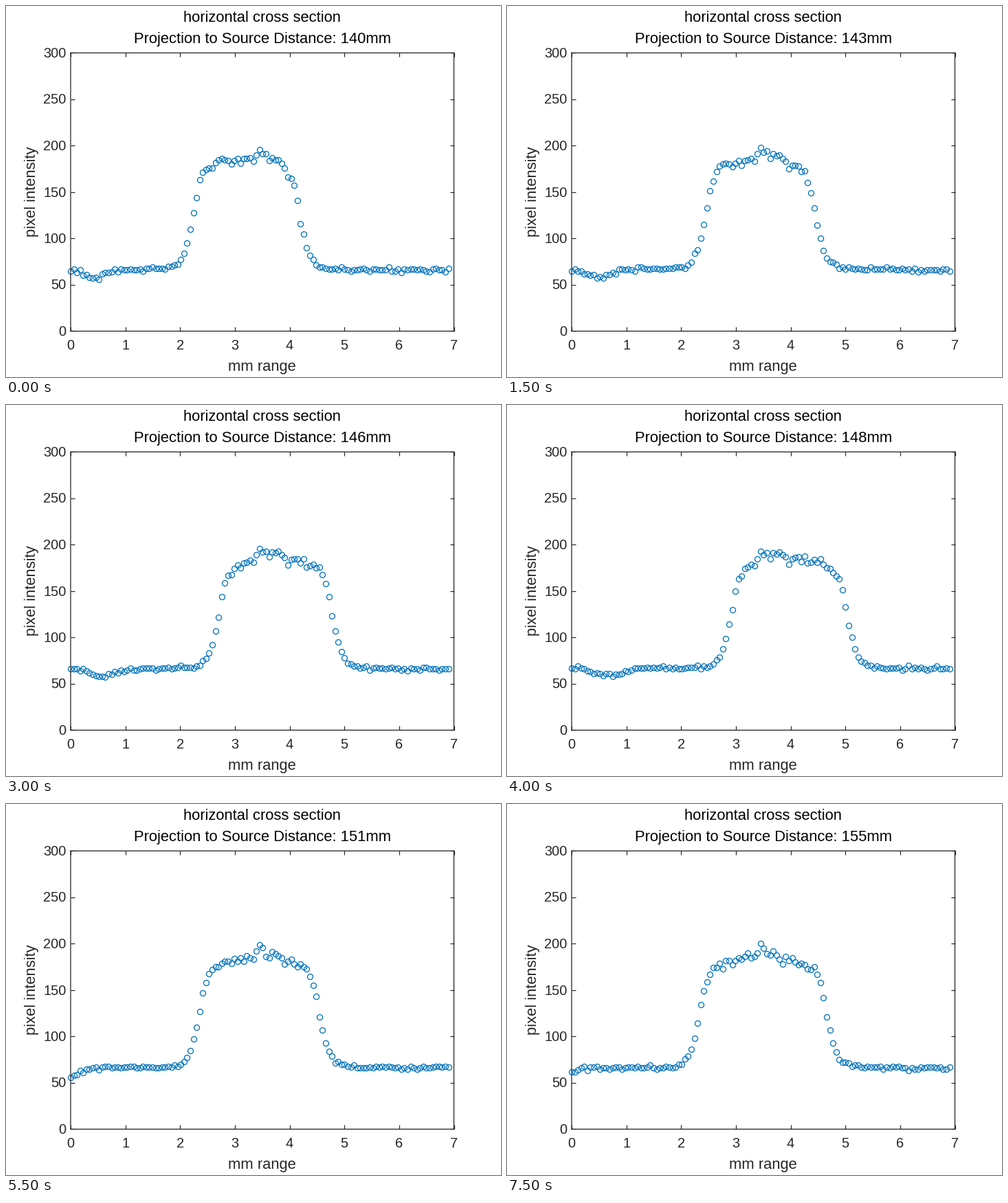
Animation of 720x540 px, one loop 8000 ms. Source, as a matplotlib script:

```python
import numpy as np
import matplotlib.pyplot as plt
from matplotlib.animation import FuncAnimation

W, H, DPI = 720, 540, 72
FIRST, FRAMES, INTERVAL = 140, 16, 500
COUNT, STEP = 121, 0.0575
LEFT, RIGHT, TOP, BOTTOM = 94, 651.5, 68.3, 473.3
INK, BLUE = "#262626", "#0072BD"

# (first distance in mm, object centre in samples) of each placement
RUNS = [(140, 55.8), (149, 56.8), (154, 59.2)]

plt.rcParams["font.family"] = "Liberation Sans"
idx = np.arange(COUNT)


def bell(at, width):
    return np.exp(-0.5 * ((idx - at) / width) ** 2)


def logistic(depth):
    """Edge with a long foot and a tighter shoulder."""
    return 1 / (1 + np.exp(-depth / np.where(depth < 0, 1.64, 1.15)))


def texture(run):
    """Plateau height: bright sensor spots plus grain that stays in place."""
    grain = np.random.default_rng(run).normal(0, 2.6, COUNT)
    return 118.5 + 14 * bell(60.2, 1.1) + 7 * bell(64.6, 1.2) + grain


def profile(mm):
    run = sum(mm >= start for start, _ in RUNS) - 1
    start, origin = RUNS[run]
    age, moved = mm - start, mm - FIRST
    centre = origin + age * (1.25 + 0.02 * moved + 0.03 * age)
    half = 16.9 + 0.14 * moved + 0.005 * moved ** 2

    u = (idx - centre) / half
    depth = half + 0.33 - np.abs(idx - centre)
    dome = 1 - 0.15 * np.minimum(u * u, 1.2)
    bump = texture(run) * dome * logistic(depth)

    halo = 2.5 * np.exp(np.minimum(depth, 0) / 9) * (depth < 0)
    dip = 8 * bell(centre - 48.5 - 1.05 * moved, 3.2)
    noise = np.random.default_rng(mm).normal(0, 1.1, COUNT) * (depth < -2)
    return np.round(66.4 + bump + halo - dip + noise)


fig = plt.figure(figsize=(W / DPI, H / DPI), dpi=DPI, facecolor="white")
ax = fig.add_axes([LEFT / W, 1 - BOTTOM / H, (RIGHT - LEFT) / W, (BOTTOM - TOP) / H])
ax.set(xlim=(0, 7), ylim=(0, 300), xticks=range(8), yticks=range(0, 301, 50))
ax.tick_params(direction="in", length=6, width=1.2, color=INK, top=True,
               right=True, labelbottom=False, labelleft=False)
for spine in ax.spines.values():
    spine.set(color=INK, linewidth=1.3, snap=False)


def label(x, y, text, size=22, color=INK, **kw):
    """Text with its baseline at pixel (x, y), y counted from the top."""
    opts = dict(ha="center", va="baseline") | kw
    return fig.text(x / W, 1 - y / H, text, size=size, color=color, **opts)


label(372.7, 23, "horizontal cross section", color="black")
title = label(372.7, 54, "", color="black")
label(372.7, 531, "mm range")
label(43.5, 270.5, "pixel intensity", rotation=90, rotation_mode="anchor")
for k in range(8):
    label(LEFT + (RIGHT - LEFT) * k / 7, 500, str(k), 20)
for v in range(0, 301, 50):
    label(87.5, BOTTOM + 6.7 - (BOTTOM - TOP) * v / 300, str(v), 20, ha="right")

dots, = ax.plot([], [], "o", ms=8, mfc="none", mec=BLUE, mew=1.3,
                clip_on=False, snap=False)


def draw(i):
    mm = FIRST + i
    title.set_text(f"Projection to Source Distance: {mm}mm")
    dots.set_data(idx * STEP, profile(mm))
    return title, dots


anim = FuncAnimation(fig, draw, frames=FRAMES, interval=INTERVAL,
                     repeat=True, repeat_delay=0)
plt.show()
```
